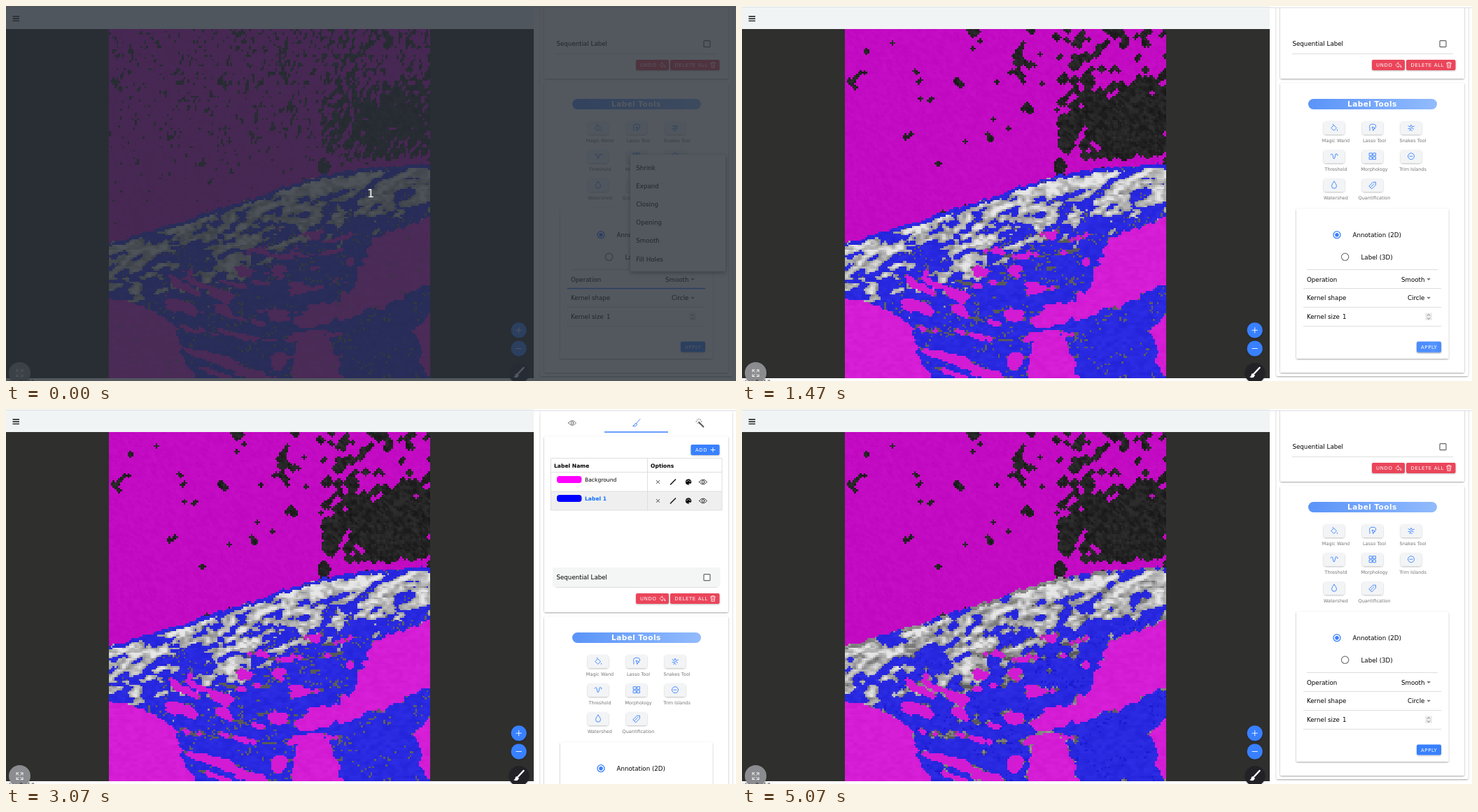
Recreate the animation shown at these times as an HTML page with a canvas. Size 1043 by 537 pixels, loop 5.54 s.

```html
<!DOCTYPE html>
<html lang="en">
<head>
<meta charset="utf-8">
<title>Label smoothing</title>
<style>
html, body { margin: 0; width: 100%; height: 100%; overflow: hidden; background: #fff; }
#bar, #view, canvas, svg { position: absolute; }
#bar { left: 0; top: 2px; width: 754px; height: 31px; background: #f1f4f4; box-shadow: 0 -1px 0 #dcdede; }
#view { left: 0; top: 33px; width: 754px; height: 500px; background: #2f2f2e; }
canvas { left: 147px; top: 0; width: 458.5px; height: 500px; image-rendering: pixelated; }
#ui { left: 0; top: 0; }
text { font: 8.7px "DejaVu Sans", sans-serif; fill: #000; }
.bold { font-weight: bold; }
.row { font-size: 7.6px; }
.caps { font-size: 6.9px; letter-spacing: .66px; fill: #fff; }
.tool { font-size: 6.5px; fill: #757575; text-anchor: middle; }
.title { font-size: 10.5px; font-weight: bold; letter-spacing: .45px; fill: #fff; }
.card { fill: #fff; filter: url(#soft); }
.raised { filter: url(#raise); }
.line { stroke: #dedede; fill: none; }
.ico { fill: none; stroke: #3880ff; stroke-width: .9; stroke-linecap: round; stroke-linejoin: round; }
.white { stroke: #fff; }
.dark { stroke: #222; }
</style>
</head>
<body>
<div id="bar"></div>
<div id="view"></div>
<svg id="ui" width="1043" height="537">
  <defs>
    <filter id="soft" x="-5%" y="-5%" width="110%" height="110%">
      <feDropShadow dx="0" dy="1" stdDeviation="1.2" flood-opacity=".36"/>
    </filter>
    <filter id="raise" x="-20%" y="-30%" width="140%" height="180%">
      <feDropShadow dx="0" dy="1" stdDeviation="1" flood-opacity=".25"/>
    </filter>
    <linearGradient id="pill"><stop stop-color="#5a94f8"/><stop offset="1" stop-color="#92bbfd"/></linearGradient>
    <clipPath id="pane"><rect x="754" y="3" width="289" height="534"/></clipPath>
    <g id="eye"><path d="M-5.5 0Q0 -7 5.5 0Q0 7 -5.5 0Z"/><circle r="1.9"/></g>
    <g id="rowIcons" class="ico dark">
      <path d="M929.5 -2l4 4m0 -4l-4 4"/>
      <path d="M949.5 3.5l7 -7" stroke-width="1.7"/>
      <circle cx="975" r="3.8" fill="#000"/>
      <path d="M973 -1h.1M975 -2.2h.1M977 -1h.1M976 3h2" stroke="#fff" stroke-width="1.3"/>
      <use href="#eye" x="996"/>
    </g>
  </defs>

  <path class="line" d="M754 2.5H1043"/>
  <g clip-path="url(#pane)"><g id="scroll">
    <rect class="card" x="763.5" y="-184" width="274" height="714" rx="2"/>
    <g class="ico">
      <use href="#eye" x="809" y="-167" stroke="#666"/>
      <path d="M906 -172.500l-6 6.500M901 -166q-2 -1 -3 1q0 2 -2.500 2.300q4 1.800 5.800 -1.200z"/>
      <path d="M990 -168l6.500 6.500" stroke="#555" stroke-width="1.800"/>
      <path d="M987 -169h-1m2 -2l-.7 -.7m2.700 -.3v-1m2 2l.8 -.8m.2 2.800h1m-5 2l-.8 .8m2.800 -.8v1" stroke="#555"/>
    </g>
    <path d="M855 -154H946" stroke="#3880ff" stroke-width="1.500"/>
    <rect class="card" x="769" y="-148" width="263" height="252" rx="2"/>
    <rect class="raised" x="978.500" y="-136" width="41" height="15" rx="2" fill="#3880ff"/>
    <text class="caps" x="985" y="-126">ADD</text>
    <path class="ico white" d="M1007 -128.500h6m-3 -3v6"/>
    <rect id="row1" x="779" y="-96" width="244" height="27" fill="#efefef"/>
    <rect id="row2" x="779" y="-69" width="244" height="27" fill="#fff"/>
    <path class="line" d="M778.500 -116.500H1023V-42H778.500ZM778.500 -96.500H1023M778.500 -69H1023M916.500 -116V-42"/>
    <text class="row bold" x="783" y="-103.300">Label Name</text>
    <text class="row bold" x="921" y="-103.300">Options</text>
    <rect x="787" y="-91" width="35.500" height="10" rx="4" fill="#f0f"/>
    <rect x="787" y="-64" width="35.500" height="10" rx="4" fill="#00f"/>
    <g id="first">
      <text class="row bold" x="827" y="-83.200" style="fill:#0d6efd">Background</text>
      <text class="row" x="827" y="-56.200">Label 1</text>
    </g>
    <g id="second" opacity="0">
      <text class="row" x="827" y="-83.200">Background</text>
      <text class="row bold" x="827" y="-56.200" style="fill:#0d6efd">Label 1</text>
    </g>
    <use href="#rowIcons" y="-82.500"/><use href="#rowIcons" y="-55.500"/>

    <rect id="hover" x="781" y="40" width="239.500" height="28" rx="3" fill="#f4f5f5" opacity="0"/>
    <text x="786.500" y="57.200">Sequential Label</text>
    <rect x="997" y="49.700" width="9" height="9" rx="1" fill="#fff" stroke="#666" stroke-width="1.200"/>
    <path class="line" d="M786 68.500H1016"/>
    <g class="raised" fill="#eb445a">
      <rect x="900" y="77" width="47" height="15" rx="2"/><rect x="949" y="77" width="70.500" height="15" rx="2"/>
    </g>
    <text class="caps" x="906" y="87">UNDO</text>
    <text class="caps" x="955.500" y="87">DELETE ALL</text>
    <path class="ico white" d="M937.500 81l-3.500 3.500l3.500 3.500v-2q3 -.3 4.500 2q-.4 -4.500 -4.500 -5zM1006.500 82h7m-5 0v-1.500h3v1.500m-4.200 0l.6 6.500h4.300l.6 -6.500m-3.700 2v3m2 -3v3" style="stroke-width:.7"/>

    <rect class="card" x="769" y="110" width="263" height="415" rx="2"/>
    <rect x="809" y="133" width="184" height="15" rx="7.500" fill="url(#pill)"/>
    <text class="title" x="865" y="144.300">Label Tools</text>
    <g id="tools"></g>

    <rect class="card" x="792" y="290" width="217.500" height="215" rx="2"/>
    <circle cx="850" cy="327.700" r="5" fill="#fff" stroke="#3880ff" stroke-width="1.300"/>
    <circle cx="850" cy="327.700" r="2.800" fill="#3880ff"/>
    <circle cx="861.600" cy="359.300" r="5.200" fill="#fff" stroke="#777" stroke-width="1.200"/>
    <text x="872.500" y="331">Annotation (2D)</text>
    <text x="884.500" y="362.500">Label (3D)</text>
    <path class="line" d="M807 377.500H994M802 404.500H999M802 431.500H999M802 458.500H999"/>
    <path id="focus" d="M802 404.500H999" stroke="#3880ff" stroke-width="1.500"/>
    <text x="807" y="394.600">Operation</text><text x="942" y="394.600">Smooth</text>
    <text x="807" y="421.400">Kernel shape</text><text x="951" y="421.400">Circle</text>
    <text x="807" y="448">Kernel size</text><text x="858" y="448">1</text>
    <path d="M978.300 390h5.600l-2.800 3zM978.300 416.800h5.600l-2.800 3z" fill="#777"/>
    <rect x="976" y="439.500" width="10" height="10.500" fill="#ececec"/>
    <path d="M979 443.500l2 -2l2 2M979 446.500l2 2l2 -2" fill="none" stroke="#666" stroke-width=".9"/>
    <rect id="press" x="964" y="481.500" width="35" height="15" rx="2" fill="#3880ff" opacity="0" filter="url(#soft)"/>
    <rect id="apply" class="raised" x="964" y="480.500" width="35" height="15" rx="2" fill="#3880ff"/>
    <circle id="ripple" cx="987" cy="488" r="7" fill="#6aa2ff" opacity="0"/>
    <text class="caps" x="970" y="490.600">APPLY</text>
  </g></g>

  <g id="menu">
    <rect x="892" y="213" width="136" height="167" rx="2" fill="#fff" style="filter:drop-shadow(0 2px 3px #0007)"/>
    <rect id="chosen" x="892" y="323" width="136" height="26.200" fill="#d9e5f8"/>
    <g id="items"></g>
  </g>

  <path d="M9.500 15h9.500M9.500 18.200h9.500M9.500 21.400h9.500" stroke="#111" stroke-width="1.400"/>
  <g class="raised" fill="#3880ff"><circle cx="732.700" cy="464.300" r="11"/><circle cx="732.700" cy="490.500" r="11"/></g>
  <path class="ico white" d="M729 464.300h7.400m-3.700 -3.700v7.400M729 490.500h7.400"/>
  <circle class="raised" cx="733" cy="525.500" r="14.500" fill="#222428"/>
  <path d="M739.500 518l-7.500 8" stroke="#fff" stroke-width="2.500" stroke-linecap="round"/>
  <path d="M730.500 526q-3 0 -3 3q-.5 2 -2.500 2q5 3.500 8 -2z" fill="#fff"/>
  <circle class="raised" cx="19.500" cy="525.500" r="15.500" fill="#8b8c8f"/>
  <path class="ico white" d="M15 524v-3h3m-3 0l3.300 3.300M24 524v-3h-3m3 0l-3.300 3.300M15 527.500v3h3m-3 0l3.300 -3.300M24 527.500v3h-3m3 0l-3.300 -3.300"/>
  <text x="0" y="541" style="font-size:7.500px">slice 0 of 0</text>

  <g id="intro" opacity="0">
    <rect width="1043" height="537" fill="rgb(40,47,55)" fill-opacity=".8"/>
    <text x="521" y="274" text-anchor="middle" style="font-size:16px;fill:#fff">1</text>
  </g>
</svg>
<script>
const LOOP = 5540, W = 172, H = 188, X0 = 147, Y0 = 33, CELL = 458.5 / W;
const $ = id => document.getElementById(id);
const clamp = (v, a = 0, b = 1) => Math.min(b, Math.max(a, v));
const ramp = (a, b, v) => clamp((v - a) / (b - a));

// Panel parts that repeat
const toolIcons = [
  ['Magic Wand', 'M-4 0l3.500 -3.500l4 4l-3.500 3.500zM-2 -5l1.500 1.500M4.500 3v1.200'],
  ['Lasso Tool', 'M-4 4v-3q-2 -6 4 -6q6 0 4.500 4.500M-.5 -1l4.500 2l-2 .8l-1 2.200z'],
  ['Snakes Tool', 'M-4 -2.500l2.500 1.500l1.500 -3l1.500 3l3 -1M-4 1.500h3l1 -1.500l3.500 2M-2 4.500l1 -2l2.500 2'],
  ['Threshold', 'M-5 -2q2 -3 3 0l1 5q1 2 2 -1l1 -5q1 -2 2 0q0 3 1.500 1'],
  ['Morphology', 'M-4.500 -4.500h3.700v3.700h-3.700zM.8 -4.500h3.700v3.700h-3.700zM-4.500 .8h3.700v3.700h-3.700zM.8 .8h3.700v3.700h-3.700z'],
  ['Trim Islands', 'M-4.500 0a4.500 4.500 0 1 0 9 0a4.500 4.500 0 1 0 -9 0M-2 0h4'],
  ['Watershed', 'M0 -5q-3.500 4 -3.500 6.500a3.500 3.500 0 0 0 7 0q0 -2.500 -3.500 -6.500z'],
  ['Quantification', 'M-5 1.500l5.500 -5.500h4v4l-5.500 5.500zM-3 3.300l5 -5']
];
$('tools').innerHTML = toolIcons.map(([name, d], i) => {
  const x = 846 + i % 3 * 55, y = 174.500 + Math.floor(i / 3) * 41;
  return `<rect class="raised" x="${x - 15}" y="${y - 9.500}" width="30" height="19" rx="4" fill="#f2f4f6"/>
    <path class="ico" transform="translate(${x} ${y - .3})" d="${d}"/>
    <text class="tool" x="${x + 2.500}" y="${y + 20}">${name}</text>`;
}).join('');
$('items').innerHTML = ['Shrink', 'Expand', 'Closing', 'Opening', 'Smooth', 'Fill Holes']
  .map((name, i) => `<text x="900.300" y="${234.500 + i * 26.200}">${name}</text>`).join('');

// Procedural scan: grey values plus two label classes
const hash = (i, j, s) => {
  const v = Math.sin(i * 127.1 + j * 311.7 + s * 74.7) * 43758.5453;
  return v - Math.floor(v);
};
function noise(x, y, s) {
  const i = Math.floor(x), j = Math.floor(y), ease = t => t * t * (3 - 2 * t);
  const u = ease(x - i), v = ease(y - j);
  const mix = k => hash(i, k, s) * (1 - u) + hash(i + 1, k, s) * u;
  return mix(j) * (1 - v) + mix(j + 1) * v;
}
const edge = [[140, 342], [200, 325], [250, 310], [300, 292], [350, 277], [400, 258],
  [440, 246], [480, 237], [530, 232], [610, 226]];
function edgeAt(x) {
  const k = edge.findIndex(p => p[0] > x), [ax, ay] = edge[k - 1], [bx, by] = edge[k];
  return ay + (by - ay) * (x - ax) / (bx - ax);
}
const blobs = new Path2D(`M130 416L176 424 214 440 240 457 250 490 257 545H130Z
  M620 297L560 318 526 333 512 360 500 384 498 402 470 424 425 442 408 458 440 460 475 449 520 438 545 428 572 412 620 392Z
  M404 545L412 500 414 474 440 466 464 474 468 500 478 545Z
  M620 426L596 445 582 468 592 480 590 510 600 530 620 530Z`);
const probe = document.createElement('canvas').getContext('2d');
const grey = new Float32Array(W * H), raw = new Uint8Array(W * H);

function backdrop(x, y, above) {
  const far = Math.hypot((x - 558) / 105, (y - 170) / 66);
  let cut = .16 + .2 * ramp(190, 470, x) + .55 * clamp(1.250 - far);
  cut += .16 * (noise(x / 22, y / 22, 4) - .5);
  cut *= x > 450 ? ramp(4, 14, above) : .25 + .75 * ramp(20, 140, above);
  if (Math.hypot((x - 454) / 9, (y - 230) / 13) < 1) cut = .75;
  return noise((x + y * .25) / 3.300, y / 6.500, 1) < cut ? 0 : 1;
}
function tissue(x, y, d) {
  const fine = noise(x / 6, y / 4, 6);
  const jitter = (noise(x / 7, y / 7, 8) - .5) * 9;
  if (probe.isPointInPath(blobs, x + jitter, y + jitter))
    return [80 + 30 * fine, hash(x, y, 3) < .006 ? 0 : 1];
  const bend = y + (x - 400) ** 2 / 600;
  const streak = noise(x / 26, bend / 8, 5) * .8 + fine * .2;
  const zone = ramp(45, 85, d) * ramp(520, 470, x) * ramp(190, 240, x);
  if (streak > 1.050 - .43 * zone) return [90, 1];
  const n = .72 * noise(x / 17, (y + .35 * x) / 7.500, 2) + .28 * fine;
  const cut = d < 6 ? .78 : .36 + (d / (x < 350 ? 205 : 165)) ** 2;
  if (n > cut) return [clamp(150 + 200 * (n - cut) + 50 * (fine - .5), 110, 230), 0];
  const dust = noise(x / 14, y / 14, 9) > .55 && hash(x, y, 7) < .12;
  return dust ? [95, 0] : [115 + 40 * fine, 2];
}
for (let i = 0; i < W * H; i++) {
  const x = X0 + (i % W + .5) * CELL, y = Y0 + (Math.floor(i / W) + .5) * CELL;
  const d = y - edgeAt(x) + (noise(x / 6, 0, 11) - .5) * 5;
  if (d < 0) {
    grey[i] = 22 + 26 * noise((x + y) / 7, (y - x) / 4, 10);
    raw[i] = backdrop(x, y, -d);
  } else [grey[i], raw[i]] = tissue(x, y, d);
}

// Opening then closing with a 3x3 cross
function spread(mask, value) {
  const at = (x, y) => mask[clamp(y, 0, H - 1) * W + clamp(x, 0, W - 1)] === value;
  return mask.map((v, i) => {
    const x = i % W, y = Math.floor(i / W);
    return at(x, y) || at(x - 1, y) || at(x + 1, y) || at(x, y - 1) || at(x, y + 1) ? value : 1 - value;
  });
}
function smooth(labels, id) {
  const mask = [0, 1, 1, 0].reduce(spread, labels.map(v => v === id ? 1 : 0));
  return labels.map((v, i) => v && v !== id ? v : mask[i] ? id : 0);
}
function paint(labels) {
  const canvas = document.createElement('canvas');
  canvas.width = W;
  canvas.height = H;
  canvas.style.opacity = 0;
  const ctx = canvas.getContext('2d'), img = ctx.createImageData(W, H);
  labels.forEach((label, i) => {
    const tint = [null, [255, 0, 255], [0, 0, 255]][label];
    for (let c = 0; c < 3; c++) img.data[i * 4 + c] = tint ? tint[c] * .72 + grey[i] * .3 : grey[i];
    img.data[i * 4 + 3] = 255;
  });
  ctx.putImageData(img, 0, 0);
  $('view').append(canvas);
  return canvas;
}
const pink = smooth(raw, 1);
const layers = [raw, pink, smooth(pink, 2)].map(paint);

// Timeline: [ms, value] steps, each held until the next
function play(el, prop, steps) {
  const frames = steps.map(([t, v]) => ({ offset: t / LOOP, [prop]: v, easing: 'steps(1, end)' }));
  frames.push({ offset: 1, [prop]: steps[steps.length - 1][1] });
  el.animate(frames, { duration: LOOP, iterations: Infinity });
}
const shift = px => `translateY(${px}px)`;
play(layers[0], 'opacity', [[0, 1], [1470, 0]]);
play(layers[1], 'opacity', [[0, 0], [1470, 1], [3930, 0]]);
play(layers[2], 'opacity', [[0, 0], [3930, 1]]);
play($('intro'), 'opacity', [[0, 1], [70, 0]]);
play($('chosen'), 'opacity', [[0, 0], [70, 1]]);
play($('menu'), 'opacity', [[0, 1], [670, .65], [730, .25], [800, 0]]);
play($('focus'), 'opacity', [[0, 1], [730, .4], [800, 0]]);
play($('scroll'), 'transform', [[0, shift(0)], [2400, shift(62)], [2470, shift(150)], [2530, shift(187)],
  [3270, shift(62)], [3330, shift(0)]]);
play($('hover'), 'opacity', [[0, 0], [2530, 1], [3270, 0]]);
play($('row1'), 'fill', [[0, '#efefef'], [3070, '#fff']]);
play($('row2'), 'fill', [[0, '#fff'], [2870, '#efefef']]);
play($('first'), 'opacity', [[0, 1], [3070, 0]]);
play($('second'), 'opacity', [[0, 0], [3070, 1]]);
play($('apply'), 'fill', [[0, '#3880ff'], [1130, '#4c8dff'], [2130, '#4287ff'], [2200, '#3880ff'],
  [3470, '#4c8dff'], [4070, '#5896ff'], [4670, '#4c8dff'], [4930, '#4287ff'], [5070, '#3880ff']]);
play($('press'), 'opacity', [[0, 0], [1400, .5], [1800, .25], [1870, 0], [3870, .5], [4070, .8], [4670, .4], [4800, 0]]);
play($('ripple'), 'opacity', [[0, 0], [1470, .35], [1730, .15], [1800, 0], [3930, .35], [4070, 0]]);
</script>
</body>
</html>
```
